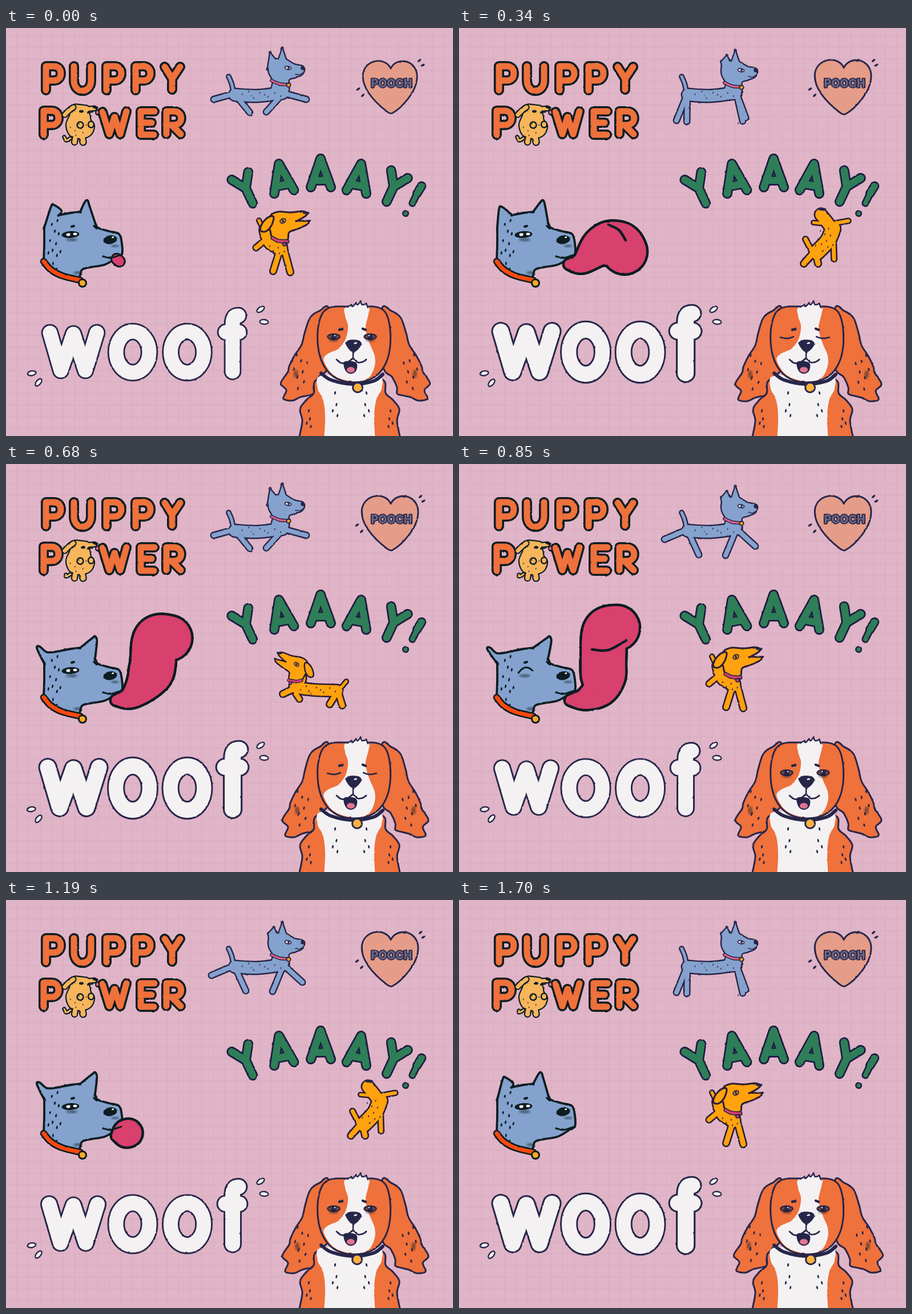
Animation of 783 by 715 pixels, one loop 1870 ms. Source, as an HTML page:

```html
<!DOCTYPE html>
<html lang="en">
<head>
<meta charset="utf-8">
<title>Puppy stickers</title>
<style>
  html, body { margin: 0; width: 100%; height: 100%; overflow: hidden; background: #dfb5c7; }
  body {
    background-image:
      repeating-linear-gradient(90deg, transparent 0 19.2px, #dc9cb577 19.2px 20.2px),
      repeating-linear-gradient(transparent 0 19.2px, #dc9cb577 19.2px 20.2px);
    background-position: 0 -6px;
  }
  svg { display: block; width: 783px; height: 715px; }
  path { stroke-linecap: round; stroke-linejoin: round; }
  text { font: 800 19.5px Inter, "Open Sans", sans-serif; text-anchor: middle; paint-order: stroke; stroke-linejoin: round; }
</style>
</head>
<body>
<svg viewBox="0 0 783 715">
  <filter id="rough" x="0" y="0" width="783" height="715" filterUnits="userSpaceOnUse">
    <feTurbulence type="fractalNoise" baseFrequency=".14" numOctaves="2" seed="4" result="noise"/>
    <feDisplacementMap in="SourceGraphic" in2="noise" scale="2" xChannelSelector="R" yChannelSelector="G"/>
  </filter>
  <filter id="soft"><feGaussianBlur stdDeviation="1.6"/></filter>
  <g id="stage" filter="url(#rough)"></g>
</svg>
<script>
const STEP = 170, STEPS = 11;
const INK = '#0b1b20', NAVY = '#28254a', ORANGE = '#ef713a', BLUE = '#84a2cd', WHITE = '#f4f1f3',
  PINK = '#d8406e', GOLD = '#ffa20b', GREEN = '#2f7e59', TAN = '#f7b55c';

// Smooth curve through "x,y" points; a trailing "!" makes a sharp corner.
function curve(text, closed) {
  const pts = text.trim().split(/\s+/).flatMap(s => {
    const p = s.replace('!', '').split(',').map(Number);
    return s.endsWith('!') ? [p, p] : [p];
  });
  const n = pts.length;
  const at = i => pts[closed ? (i + n) % n : Math.max(0, Math.min(n - 1, i))];
  let d = 'M' + pts[0];
  for (let i = 0; i < (closed ? n : n - 1); i++) {
    const [a, b, c, e] = [at(i - 1), at(i), at(i + 1), at(i + 2)];
    const c1 = b.map((v, k) => v + (c[k] - a[k]) / 6);
    const c2 = c.map((v, k) => v - (e[k] - b[k]) / 6);
    d += `C${c1} ${c2} ${c}`;
  }
  return d + (closed ? 'Z' : '');
}
const path = (d, fill, ink, w) => `<path d="${d}" fill="${fill}" stroke="${ink}" stroke-width="${w}"/>`;
const shape = (pts, fill, ink = NAVY, w = 3) => path(curve(pts, true), fill, ink, w);
const line = (pts, ink = NAVY, w = 2.5) => path(curve(pts), 'none', ink, w);
const oval = (x, y, rx, ry, fill, ink = 'none', w = 2, turn = 0) =>
  `<ellipse cx="${x}" cy="${y}" rx="${rx}" ry="${ry}" fill="${fill}" stroke="${ink}" stroke-width="${w}" transform="rotate(${turn} ${x} ${y})"/>`;
const smudge = (x, y, rx, ry) => `<g filter="url(#soft)" opacity=".45">${oval(x, y, rx, ry, INK)}</g>`;
const group = (content, transform) => `<g transform="${transform}">${content}</g>`;
const mirror = (content, axis) => content + group(content, `translate(${2 * axis}) scale(-1 1)`);
const bubble = (d, fill, ink, w, rim) => path(d, 'none', ink, w + rim * 2) + path(d, 'none', fill, w);
const band = (pts, color, ink, w, rim) => bubble(curve(pts), color, ink, w, rim);

// Fuses limbs [width, points] and solids [0, outline] into one inked silhouette.
function figure(parts, fill, ink = NAVY, rim = 2.5) {
  const pass = (color, grow) => parts.map(([w, pts]) => w
    ? path(curve(pts), 'none', color, w + grow)
    : path(curve(pts, true), color, color, grow)).join('');
  return pass(ink, rim * 2) + pass(fill, 0);
}

// Evenly scattered marks inside an oval.
function freckles(count, x, y, rx, ry, ink = NAVY, size = 2.4) {
  let marks = '';
  for (let i = 0; i < count; i++) {
    const r = Math.sqrt((i + .5) / count), a = i * 2.4;
    marks += oval(x + rx * r * Math.cos(a), y + ry * r * Math.sin(a), size / 2, size, ink, 'none', 0, 12);
  }
  return marks;
}

function puppyPower(n) {
  const P = (x, y) => `M${x} ${y}v-42h14c16 0 16 25 0 25h-14`;
  const late = n % 6 > 2, dx = late ? 3 : 0;
  const words = P(70, 109) + 'M119 67V92C119 116 149 116 149 92V67' + P(176, 109) + P(227, 109) +
    'M278 68L291 89L305 68M291 89V108' + P(66, 187) +
    'M169 147L181 186L190 156L200 186L211 146M260 146H236V187H259M236 166H255' +
    'M281 186V146H294C311 146 311 170 294 170H282M290 170L306 186';
  const pup = oval(160, 148, 3, 4, '#e0698a', INK, 2) +
    figure([
      [0, '118,146 143,148 148,162 154,172 148,187 131,193 113,188 106,171 111,156'],
      [11, '122,140 140,142'], [6, '140,142 155,141'],
      [8, '121,194 120,200'], [9, '134,194 135,200'],
      [3, `113,193 106,197 ${102 + dx},${191 + dx}`]
    ], TAN, INK, 2.2) +
    figure([[7, '118,139 111,144 103,152']], TAN, INK, 2.2) +
    oval(130, 170, 5.5, 5.5, TAN, INK, 2.5) + oval(149, 169, 5, 5.5, TAN, INK, 2.5) +
    line('154,138 159,140', INK, 5) + oval(132 + dx, 146, 4, 2.5, INK) + line('143,149 152,147', INK, 2) +
    freckles(7, 127, 176, 18, 13, INK, 1.4);
  return bubble(words, ORANGE, INK, 11, 3.5) + pup;
}

// Foot positions for leap, stride and stand.
const FEET = ['526,125 519,144 502,157', '456,147 467,160 497,163', '427,148 420,159 399,164', '364,125 360,132 381,162']
  .map(keys => keys.split(' '));
function runner(n) {
  const pose = [0, 1, 2, 1][n % 4];
  const legs = FEET.map((keys, i) => [8, (i < 2 ? '486,114 ' : '400,115 ') + keys[pose]]);
  const dy = pose ? 4 : 0;
  const ear = pose ? '462,72! 460,55! 469,45! 475,58!' : '459,70! 463,45! 474,58!';
  const head = `466,${113 - dy} 468,93 461,78 461,64 467,56 478,55! 484,37! 490,55! 505,64 518,67 522,72 518,81 507,86 495,91 493,${113 - dy}`;
  const shift = pts => pts.replace(/,(\d+)/g, (_, y) => ',' + (+y + dy));
  const face = oval(494, 70, 5.5, 2.8, WHITE, NAVY, 1.8, 10) + oval(495, 70, 1.8, 2, NAVY) +
    oval(520, 70, 3.8, 3.8, NAVY) + line('507,81 514,82 520,79', NAVY, 1.5) +
    band('465,92 479,98 492,99', '#e0628c', NAVY, 3, 1.5) + oval(495, 100, 3.6, 3.6, GOLD, NAVY, 2);
  return figure([
    [20, '401,117 440,119 484,114'], [5, '398,110 395,97 390,85'], ...legs, [0, shift(ear)], [0, shift(head)]
  ], BLUE, NAVY, 2.4) + group(face, `translate(0 ${dy})`) + freckles(9, 443, 117, 42, 7, NAVY, 1.6) +
    (pose == 2 ? freckles(2, 450, 167, 78, 2, NAVY, 1.8) : '');
}

function heart(n) {
  const big = n % 3 ? 1 : 0, k = 1 + big * .04;
  const body = path('M674 71C683 51 717 54 720 82C722 112 690 142 677 149Q673 151 668 147C650 133 625 110 625 84C626 55 664 49 674 71Z', '#e59d89', NAVY, 2.8);
  const tick = (x, y, turn) => oval(x, y, 1.8, 3.8, NAVY, 'none', 0, turn);
  return group(body, `translate(673 104) scale(${k}) translate(-673 -104)`) +
    `<text x="675.5" y="103.5" fill="#6a6581" stroke="${NAVY}" stroke-width="3.6">POOCH</text>` +
    tick(724 + big * 2, 57, 48) + tick(730 + big, 65, 60) + tick(617 - big * 2, 107, 55) + tick(625 - big * 2, 118, 45);
}

function yaaay() {
  const A = 'M-17 50L0 0L18 50M-13 38H14', Y = 'M-16 -24L0 0L16 -24M0 0V29';
  const letters = [[Y, 420, 281, -25], [A, 478, 238, -10], [A, 551, 229, 0], [A, 622, 238, 10], [Y, 679, 278, 25]];
  const ink = '#1d1a40';
  return letters.map(([d, x, y, turn]) => group(bubble(d, GREEN, ink, 12.5, 2.7), `translate(${x} ${y}) rotate(${turn})`)).join('') +
    figure([[11, '728,277 720,290'], [8, '720,290 712,307']], GREEN, ink, 2.7) + oval(700, 325, 4.8, 4.8, GREEN, ink, 2.5);
}

const playerHead = () =>
  shape('-26,3 -21,-10 -8,-16 14,-15 34,-17 44,-14! 39,-8 25,0! 46,0! 43,6 26,14 11,20 7,34 -17,30 -22,18', GOLD, '#2a1d35') +
  shape('-16,-6 -20,8 -29,18 -38,18 -39,10 -31,-2 -22,-8', GOLD, '#2a1d35') +
  oval(0, 0, 5, 3.6, GOLD, NAVY, 2, -25) + oval(0, 0, 2, 2.2, NAVY) + line('37,-15 43,-13', NAVY, 5) +
  band('-18,30 -8,35 8,36', PINK, NAVY, 4, 1.6) + oval(3, 41, 3, 3, PINK, NAVY, 2);
const spin = {
  limbs: [[24, '477,372 480,386'], [17, '453,354 461,377 476,386'], [9, '478,394 468,426'], [9, '488,390 498,428'],
    [8, '451,374 438,385'], [5, '450,352 443,337']],
  head: 'translate(485 338)', spots: [9, 473, 385, 16, 20]
};
const dash = {
  limbs: [[29, '541,410 585,411 632,411'], [9, '535,415 519,443'], [9, '538,420 546,447'], [9, '630,420 621,445'],
    [10, '640,418 658,440'], [5, '531,404 518,385']],
  head: 'translate(638 365) rotate(-10) scale(1.03)', spots: [13, 585, 411, 52, 12]
};
const away = {
  limbs: [[20, '634,327 646,342 653,352'], [25, '655,352 646,373 627,393'], [6, '660,342 682,338'], [5, '642,343 621,341'],
    [7, '656,375 657,405'], [9, '625,395 629,413'], [9, '618,397 604,413'], [7, '618,391 607,370']],
  spots: [11, 640, 373, 18, 24]
};
const leap = {
  limbs: [[22, '576,338 570,351'], [19, '570,354 603,358 641,359'], [9, '566,356 547,365'], [8, '570,365 576,374'],
    [9, '640,365 629,383'], [9, '645,365 651,385'], [5, '648,355 658,343']],
  head: 'translate(571 313) rotate(14) scale(-.84 .84)', spots: [9, 604, 358, 38, 8]
};
function player(n) {
  const { limbs, head, spots } = [spin, dash, away, leap, leap][n % 5];
  const dog = figure(limbs, GOLD, '#2a1d35', 2.6) + freckles(...spots, NAVY, 1.8) +
    (head ? group(playerHead(), head) : line('632,317 640,318', NAVY, 5));
  return group(dog, n % 5 == 4 ? 'translate(-62 38)' : '');
}

// Centre lines of the tongue as it unrolls and is pulled back in.
const TONGUES = [
  '194,405 199,409', '194,413 218,409 234,408', '193,414 216,412 249,382 280,379 291,394',
  '193,414 215,412 240,372 266,322 300,330 304,408', '193,414 222,407 254,365 262,308 287,305',
  '195,414 223,411 250,389 253,340 256,294 277,287', '194,414 222,421 265,421 293,385 291,331', '194,413 216,408'
];
const CREASES = { 2: '262,345 280,354 292,372', 3: '262,289 279,300 292,325 293,368', 5: '233,325 262,326 293,309', 6: '206,400 226,405 250,388 260,355' };
function tongue(n) {
  if (!TONGUES[n]) return '';
  const guide = document.createElementNS('http://www.w3.org/2000/svg', 'path');
  guide.setAttribute('d', curve(TONGUES[n]));
  const length = guide.getTotalLength(), tip = Math.min(38, 8 + 15 * Math.min(n, 8 - n));
  const pass = (color, grow) => {
    let s = '';
    for (let at = 0; at <= length; at += 3) {
      const p = guide.getPointAtLength(at), r = 8 + (tip - 8) * Math.min(1, at / 85 + (length < 85 ? at / length : 0));
      s += oval(p.x, p.y, r + grow, r + grow, color);
    }
    return s;
  };
  return pass(INK, n ? 4.5 : 3) + pass(PINK, 0) + (CREASES[n] ? line(CREASES[n], INK, 4.5) : '');
}
function licker(n) {
  const sway = Math.cos(n / STEPS * 2 * Math.PI);
  const ax = 65 + 15 * sway, ay = 316 - 6 * sway, bx = 149 - 8 * sway, by = 302;
  const head = shape(`67,350! ${ax - 1},${ay + 3} ${ax + 4},${ay} ${ax + 17},${ay + 10} 93,328! 113,324 130,322! ${bx - 3},${by + 3} ${bx + 2},${by} ${bx + 5},${by + 9} 156,341! 161,350 180,356 198,361 203,378 203,397 193,403 172,415 136,422 130,433 127,443! 100,435 80,424 66,407! 67,380`, BLUE, INK, 3.8);
  const eye = n == 5 || n == 6
    ? line('104,366 112,358 121,357 129,362', INK, 3)
    : oval(113, 362, 15, 5.5, INK, INK, 1, -4) + oval(109, 362, 3.5, 2.6, WHITE) + oval(121, 361, 3.5, 2.2, WHITE);
  return head + tongue(n) + line('170,400 183,403 202,397', INK, 3) + smudge(115, 371, 10, 3) + smudge(126, 429, 8, 3) +
    eye + line('115,348 119,347', INK, 4) + oval(182.5, 371, 12, 7.5, INK, 'none', 0, -8) + oval(187, 367, 2, 1.2, WHITE) +
    smudge(191, 382, 7, 2.5) + line('154,347 159,351', INK, 4) + freckles(12, 85, 378, 13, 48, INK, 3) +
    band('66,409 78,423 98,434 130,442', '#fb490e', INK, 7, 2.7) + oval(134, 447, 6.5, 6.5, '#f9aa25', INK, 3);
}

function woof(n) {
  const grow = .05 - .05 * Math.cos(n * Math.PI / 3);
  const glyph = (d, x, y, spread) => group(bubble(d, WHITE, NAVY, 25, 2.8),
    `translate(${x} ${y}) scale(${1 + grow * spread} ${1 + grow}) translate(${-x} ${-y})`);
  const o = x => glyph(`M${x - 29} 568a29 36 0 1 0 58 0a29 36 0 1 0 -58 0Z`, x, 568, .2);
  const drop = (x, y, turn) => oval(x, y, 7.5, 4, WHITE, NAVY, 2.3, turn);
  return glyph('M77 534L96 600L118 536L139 600L159 534', 117.5, 567, 1.25) + o(222) + o(317.5) +
    glyph('M397 602V520C397 505 402 504 407 504M385 533H408', 396, 556, 1.6) +
    drop(446, 493, -35) + drop(452, 515, 5) + drop(45 - grow * 10, 605, -10) + drop(57, 621 + grow * 10, -50);
}

function spaniel(n) {
  const turned = n < 2 || n > 7, shut = n == 2 || n == 4;
  const ear = shape('566,494 549,496 533,508 524,535 519,556 507,575 498,594 496,604 484,624 494,636 489,651 505,654 518,648 530,645 542,641 542,630 550,612 566,590', ORANGE) +
    freckles(8, 518, 603, 16, 34, NAVY, 3) + smudge(510, 607, 4, 7);
  const ears = mirror(group(ear, `rotate(${turned ? 1.2 : 0} 556 495)`), 612);
  const flank = shape('602,612! 545,616 539,640 526,652 515,668 519,688 514,716! 514,730! 602,730!', ORANGE);
  const chest = shape('602,610! 550,610 546,632 555,650 559,680 557,725! 603,725!', WHITE, 'none');
  const skull = 'M610 488H642C662 489 670 498 673 530C677 580 660 621 610 621C560 621 543 580 546 530C550 498 558 489 578 488Z';
  const head = path(skull, ORANGE, 'none', 0) +
    shape('596,489 594,505 599,522 595,545 582,562 562,572 557,584 575,609 610,620 634,614 645,595 646,575 636,550 630,525 634,490', WHITE, 'none') +
    path(skull, 'none', NAVY, 3) +
    shape('595,496 601,488 605,486! 607,489 613,482! 616,486 621,480! 624,486 631,483! 635,496', WHITE, 'none') +
    line('598,489 605,485! 607,488 613,482! 616,485 621,479! 624,485 631,483! 634,490');
  const eye = oval(574, 541, 10.5, 4.8, '#7b4637', NAVY, 2.5) + oval(574, 541, 4.5, 4.8, NAVY) + oval(576, 539, 1.2, 1.2, WHITE) + smudge(574, 547, 8, 3);
  const eyes = mirror(shut ? line('563,542 575,544 586,541') : eye, 606);
  const mouth = shape('593,586 606,585 614,589 612,601 603,605 595,599', NAVY, NAVY, 2) + oval(604, 599, 7, 5, '#e27491') +
    line('579,581 587,587 599,586 608,579 616,586 625,585 631,581', NAVY, 2.8) + line('608,567 608,580');
  const nose = shape('595,552 603,547 618,548 622,555 613,566 604,566', NAVY, NAVY, 1) + oval(612, 552, 3, 1.5, WHITE);
  const collar = line('552,605 570,617 606,624 643,619 660,607', NAVY, 6) + oval(turned ? 616 : 615, 630, 8.5, 8.5, '#f9b13f', NAVY, 3);
  return ears + mirror(flank, 602) + mirror(chest, 602) + mirror(freckles(4, 530, 685, 7, 18, NAVY, 3), 602) +
    mirror(freckles(4, 576, 660, 8, 26, NAVY, 3), 604) + head + eyes +
    mirror(line('584,529 589,527', NAVY, 4.5), 607) + mouth + nose + collar;
}

const stage = document.getElementById('stage');
const scene = [puppyPower, runner, heart, yaaay, player, licker, woof, spaniel];
let shown = -1;
function tick() {
  const n = Math.floor(performance.now() / STEP) % STEPS;
  if (n !== shown) {
    shown = n;
    stage.innerHTML = scene.map(draw => draw(n)).join('');
  }
  requestAnimationFrame(tick);
}
tick();
</script>
</body>
</html>
```
